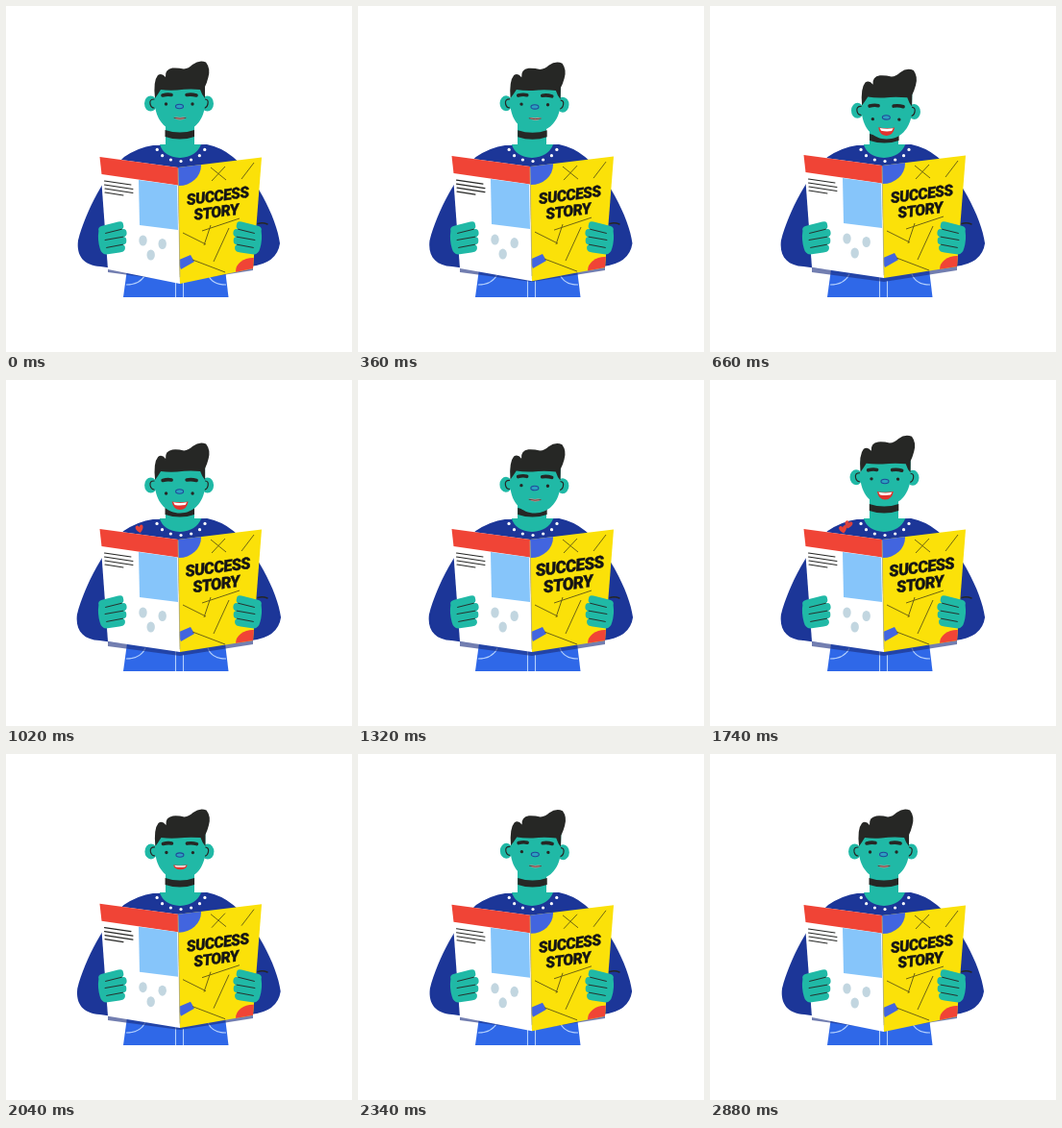
These frames come from a looping animation (360 by 360 pixels, 2.91 s). An HTML page:

```html
<!DOCTYPE html>
<html lang="en">
<head>
<meta charset="utf-8">
<title>Reader</title>
<style>
html, body { margin: 0; width: 100%; height: 100%; overflow: hidden; background: #fff; }
svg { display: block; width: 100vw; height: 100vh; }
.skin { fill: #20b9a6; }
.navy { fill: #1c3698; }
.ink { fill: #262725; }
.blue { fill: #4265df; }
.line { fill: none; stroke: #262725; stroke-linecap: round; stroke-linejoin: round; }
.rule { fill: none; stroke: #6f6412; stroke-width: 1; }
.seam { fill: none; stroke: #b4d0fc; stroke-width: 1.1; }
text { font: italic 800 16px Roboto, "Liberation Sans", sans-serif; letter-spacing: -.5px; text-anchor: middle; fill: #151515; stroke: #151515; stroke-width: .35; }
</style>
</head>
<body>
<svg viewBox="0 0 360 360">
  <defs>
    <g id="hand" transform="rotate(-4 110 242)">
      <path class="skin" d="M97 233Q96 229 101 228L118 225Q123 224 123 228Q124 232 121 233Q126 232 126 237Q126 241 122 241Q126 241 125 246Q125 249 121 249Q124 250 123 254Q122 257 117 257L103 258Q98 257 97 251Q95 242 97 233Z"/>
      <path class="line" stroke-width=".9" d="M104 236L121 233M103 243L122 241M104 251L121 249"/>
    </g>
    <path id="heart" fill="#e84238" d="M0 4C-5 .5-4.800-4-2-4Q-.4-4 0-2Q.6-4 2.200-4C5-4 4.600 .8 0 4Z"/>
    <clipPath id="coverClip"><path id="coverEdge"/></clipPath>
  </defs>

  <path fill="#2f68e8" d="M126 274H228L231.500 303H122Z"/>
  <path class="seam" d="M176.500 280V303M184.500 286V303M125 290Q140 290 145 279M229 290Q214 290 210 279"/>

  <g id="body">
    <path class="navy" d="M153 145Q138 147 123 157C104 174 83 213 75 244C73 260 81 270 98 271L112 273L181 280L254 271Q282 268 285 247C282 220 257 174 236 157Q224 147 209 144Z"/>
    <path class="skin" d="M160 144Q164 157 181 158Q198 157 203 144Z"/>
    <g id="dots" fill="#fff"></g>
  </g>

  <path class="skin" d="M166 118H196V145Q196 155 181 156Q166 155 166 145Z"/>
  <path id="choker" class="ink" d="M165.500 129Q181 134 196 129V136Q181 141 165.500 136Z"/>

  <g id="head">
    <ellipse class="skin" cx="150.500" cy="101.500" rx="6.500" ry="8"/>
    <ellipse class="skin" cx="209.500" cy="101.500" rx="6.500" ry="8"/>
    <path class="line" stroke-width="1.200" d="M154 97Q149 97 150 102Q151 106 154 106M207 97Q211 97 210 102Q209 106 206 106"/>
    <path class="skin" d="M155 84V104C157 121 168 130.500 181 130.500C195 130.500 205 120 207 104V82L180 74Z"/>
    <path class="ink" d="M155 96Q153 78 158 72Q162 69 166 74Q165 66 173 64.500Q179 64 185 65.500Q190 65 194 61Q201 55.500 208 58.500Q213 65 210.500 74Q209 80 207 84V96Q204 93 202 87Q190 86 178 87.500Q168 88 161 87Q158 92 155 96Z"/>
    <g id="face">
      <path class="line" stroke-width="3.600" d="M163 93Q168 91.500 172 92.500M188 92.500Q193 91.500 198 93"/>
      <g id="eyes" class="ink"><circle cx="166.500" cy="102" r="1.700"/><circle cx="194" cy="102" r="1.700"/></g>
      <ellipse cx="180.500" cy="104.500" rx="4" ry="2.200" fill="#2aa3c0" stroke="#22489a" stroke-width="1.100"/>
      <g id="calm">
        <path d="M174 116Q178 115 181 116Q184 115 188 116Q181 121 174 116Z" fill="#d9908c"/>
        <path class="line" stroke="#7b4f55" stroke-width=".7" d="M175 116.500Q181 118 187 116.500"/>
      </g>
      <g id="smile">
        <path d="M172.500 115Q181 116.500 189.500 115Q188 123.500 181 123.500Q174 123.500 172.500 115Z" fill="#e0322e"/>
        <path d="M174 115.800Q181 117 188 115.800L186.500 118.500Q181 119.500 175.500 118.500Z" fill="#fff"/>
      </g>
    </g>
  </g>

  <g id="hearts"></g>

  <path fill="#1c2f80" fill-opacity=".62" d="M106 268L181 280L257 268V275L181 287L106 277Z"/>
  <g id="mag">
    <path id="page" fill="#fff"/>
    <path fill="#f04436" d="M97.500 157L179 168V186.500L99.500 175Z"/>
    <path fill="#86c5fa" d="M138 181L178 186.500L179 233L139 228Z"/>
    <path class="line" stroke-width="1.100" d="M102.500 182L130 186M102.500 186L132 190.500M103 190L132 194.500M103 194L122 197"/>
    <g fill="#c2d6e0">
      <ellipse cx="142.500" cy="244" rx="4.200" ry="5.500"/>
      <ellipse cx="162.700" cy="247.500" rx="4.200" ry="5.500"/>
      <ellipse cx="150.700" cy="259" rx="4.200" ry="5.500"/>
    </g>
    <path id="cover" fill="#fbe109"/>
    <g clip-path="url(#coverClip)">
      <ellipse class="blue" cx="180" cy="166" rx="23" ry="21"/>
      <ellipse fill="#f04436" cx="257" cy="276" rx="18" ry="14"/>
      <path class="blue" d="M178 265L192 259L196 266L182 274Z"/>
      <path class="rule" d="M213 168L229 181M214 182L228 167M245 180L258 163M184 236L208 248M206 249L213 228M204 234L243 221M216 266L232 231M194 264L228 277"/>
    </g>
    <path fill="none" stroke="#b9b07a" stroke-width=".7" d="M179 169L181 282"/>
    <g id="title">
      <text x=".7" y="-3">SUCCESS</text>
      <text x="-3" y="13.500">STORY</text>
    </g>
  </g>

  <use href="#hand"/>
  <use href="#hand" transform="matrix(-1 0 0 1 362 0)"/>
  <path class="line" stroke-width="1.500" d="M262 226.500Q267 225 272 227"/>
</svg>
<script>
const LOOP = 2910, STEP = 30;
const $ = id => document.getElementById(id);
const put = (id, name, value) => $(id).setAttribute(name, value);
const move = (id, value) => put(id, "transform", value);

function add(parent, tag, attrs) {
  const el = document.createElementNS("http://www.w3.org/2000/svg", tag);
  for (const name in attrs) el.setAttribute(name, attrs[name]);
  $(parent).append(el);
  return el;
}

// Eased rise from 0 to 1 between a and b.
function ramp(t, a, b) {
  const p = Math.max(0, Math.min(1, (t - a) / (b - a)));
  return (1 - Math.cos(Math.PI * p)) / 2;
}
const hold = (t, a, b, c, d) => ramp(t, a, b) - ramp(t, c, d);

// Beads of the collar lie on an arc.
for (let deg = 18; deg <= 162; deg += 24) {
  const a = deg * Math.PI / 180;
  add("dots", "circle", { cx: 182 - 26 * Math.cos(a), cy: 144 + 17.5 * Math.sin(a), r: 1.6 });
}

// Small hearts rise from behind the page and fade.
const hearts = [
  { start: 870, x: 139, turn: -12 },
  { start: 1510, x: 144, turn: 16 },
  { start: 1600, x: 138.5, turn: -12 }
].map(h => ({ ...h, el: add("hearts", "use", { href: "#heart" }) }));

function drawHeart({ el, start, x, turn }, t) {
  const p = (t - start) / 300;
  const on = p > 0 && p < 1;
  el.setAttribute("opacity", on ? Math.min(1, 4 * (1 - p)) : 0);
  el.setAttribute("transform", `translate(${x} ${163 - 16 * p}) rotate(${turn})`);
}

function draw(t) {
  const sway = 2 * (1 - Math.cos(6 * Math.PI * t / LOOP));
  const bow = hold(t, 300, 680, 1340, 1720);
  const laugh = hold(t, 380, 620, 1050, 1270) + hold(t, 1450, 1680, 1900, 2200);
  const lift = hold(t, 150, 600, 1750, 2500);
  const swell = hold(t, 700, 1380, 1380, 2080);

  const wide = 1 + 0.01 * lift;
  move("body", `translate(${180.5 * (1 - wide)} 0) scale(${wide} 1)`);
  move("choker", `translate(${sway * 0.2} ${bow * 4})`);
  move("head", `translate(${sway} ${bow * 8}) rotate(${sway * 0.4} 181 108)`);
  move("face", `translate(0 ${laugh * (1 + 2.5 * bow)})`);
  move("eyes", `translate(0 ${laugh * bow * 4.5})`);

  const open = laugh > 0.2;
  put("calm", "opacity", open ? 0 : 1);
  put("smile", "opacity", open ? 1 : 0);
  move("smile", `translate(181 115) scale(${0.7 + 0.3 * laugh} ${laugh}) translate(-181 -115)`);

  const spine = 289 - 4 * lift;
  const cover = `M179 168L266 157.5L257 273L181 ${spine}Z`;
  move("mag", `translate(0 ${-2 * lift})`);
  put("page", "d", `M97.500 157L179 168L181 ${spine}L106 274Z`);
  put("cover", "d", cover);
  put("coverEdge", "d", cover);
  move("title", `translate(220.500 ${206 - swell}) rotate(-7.500) scale(${1 + 0.1 * swell})`);

  for (const h of hearts) drawHeart(h, t);
}

const begin = performance.now();
function tick() {
  const t = (performance.now() - begin) % LOOP;
  draw(Math.floor(t / STEP) * STEP);
  requestAnimationFrame(tick);
}
tick();
</script>
</body>
</html>
```
